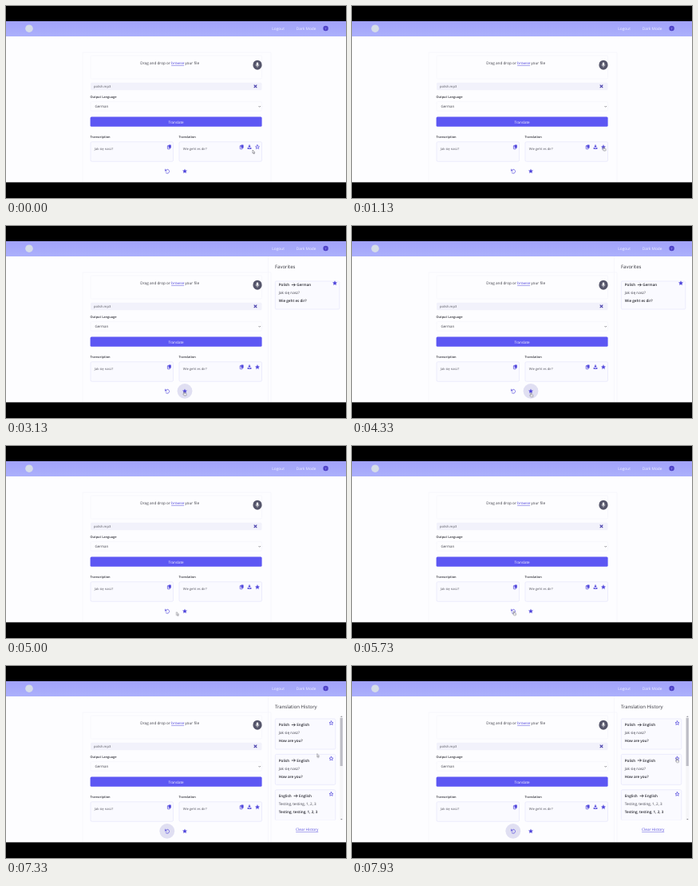
Write an HTML page that moves like this. It is 426 px wide and 240 px high and loops after 8000 ms.

```html
<!DOCTYPE html>
<html lang="en">
<head>
<meta charset="utf-8">
<title>Audio translator</title>
<style>
  html, body { margin: 0; width: 100%; height: 100%; overflow: hidden; background: #000; }
  svg { display: block; width: 100%; height: 100%; }
  text { font: 4.6px "Open Sans", "Noto Sans", sans-serif; fill: #3d3d46; text-rendering: geometricPrecision; }
  .head text { font-size: 4.8px; fill: #f0f0ff; }
  .label { font-size: 3.95px; font-weight: 600; fill: #33333a; }
  .small { font-size: 4.1px; fill: #55555e; }
  .title { font-size: 6px; font-weight: 500; fill: #33333a; }
  .bold { font-weight: 600; fill: #25252c; }
  .link { fill: #5147dc; text-decoration: underline; }
  .box { fill: #fafaff; stroke: #e6e6fb; stroke-width: .7; }
  .edge { fill: none; stroke: #f5f5fc; stroke-width: .8; }
  .solid { fill: #5147dc; }
  .line { fill: none; stroke: #5147dc; stroke-width: .7; stroke-linejoin: round; stroke-linecap: round; }
  .active { fill: #e0dff2; }
  .pointer { fill: #fff; stroke: #55555e; stroke-width: .5; stroke-linejoin: round; }

  .timed { animation: 8s step-end infinite; }
  .unsaved { animation-name: unsaved; }
  .saved { animation-name: saved; }
  .favorites { animation-name: favorites; }
  .history { animation-name: history; }
  .arrow { animation-name: arrow; }
  .hand { animation-name: hand; }
  .cursor { animation: travel 8s ease-in-out infinite; }

  @keyframes unsaved { 0% { opacity: 1 } 12%, 100% { opacity: 0 } }
  @keyframes saved { 0% { opacity: 0 } 12%, 100% { opacity: 1 } }
  @keyframes favorites { 0% { opacity: 0 } 32.5% { opacity: 1 } 60%, 100% { opacity: 0 } }
  @keyframes history { 0% { opacity: 0 } 77.5%, 100% { opacity: 1 } }
  @keyframes arrow {
    0% { opacity: 1 } 9% { opacity: 0 } 21% { opacity: 1 } 29% { opacity: 0 }
    62% { opacity: 1 } 65% { opacity: 0 } 82% { opacity: 1 } 97%, 100% { opacity: 0 }
  }
  @keyframes hand {
    0% { opacity: 0 } 9% { opacity: 1 } 21% { opacity: 0 } 29% { opacity: 1 }
    62% { opacity: 0 } 65% { opacity: 1 } 82% { opacity: 0 } 97%, 100% { opacity: 1 }
  }
  @keyframes travel {
    0%, 4% { transform: translate(309px, 180px) }
    11%, 20% { transform: translate(315.5px, 176px) }
    30%, 40% { transform: translate(223.5px, 207px) }
    54%, 59% { transform: translate(224.3px, 208.5px) }
    66%, 80% { transform: translate(203px, 206.5px) }
    91%, 93% { transform: translate(389.5px, 109.5px) }
    98%, 100% { transform: translate(407px, 115.5px) }
  }
</style>
</head>
<body>
<svg viewBox="0 0 426 240" preserveAspectRatio="none">
  <defs>
    <linearGradient id="bar" x2="0" y2="1">
      <stop stop-color="#a2a2fb"/><stop offset="1" stop-color="#abb0fb"/>
    </linearGradient>
    <path id="star" d="M0-3 .9-1 3-.8 1.4.6 1.9 2.7 0 1.6-1.9 2.7-1.4.6-3-.8-.9-1Z"/>
    <path id="outline" class="line" d="M0-2.5.8-.8 2.5-.6 1.2.5 1.6 2.2 0 1.3-1.6 2.2-1.2.5-2.5-.6-.8-.8Z"/>
    <g id="copy">
      <rect x="-2" y="-1.4" width="3" height="4" rx=".5" class="line"/>
      <rect x="-.7" y="-2.7" width="3.1" height="4" rx=".5" class="solid"/>
    </g>
    <path id="to" d="M0 0h4.6M2.8-1.7 4.6 0 2.8 1.7" fill="none" stroke="#25252c" stroke-width=".75"/>
    <clipPath id="list"><rect x="335" y="62" width="82" height="130.5"/></clipPath>
  </defs>

  <rect y="19" width="426" height="201.4" fill="#fdfdff"/>
  <g class="head">
    <rect y="19" width="426" height="19" fill="url(#bar)"/>
    <circle cx="29" cy="28.2" r="4.8" fill="#d5dce8"/>
    <text x="333.3" y="30">Logout</text>
    <text x="363.7" y="30">Dark Mode</text>
    <circle cx="400.6" cy="28" r="3.2" fill="#4d40c6"/>
    <text x="400.6" y="29.6" text-anchor="middle" style="font-size:4.3px;font-weight:600;fill:#a9a8fb">?</text>
  </g>

  <path class="edge" d="M96 220V58H332V220"/>
  <rect class="edge" x="106" y="62" width="214.5" height="29" rx="1.5"/>
  <text x="168.3" y="73.2" style="font-size:4.7px">Drag and drop or <tspan class="link">browse</tspan> your file</text>
  <rect x="309.5" y="67.7" width="11" height="12" rx="5.5" fill="#55556a"/>
  <rect x="313.8" y="70.6" width="2.4" height="4" rx="1.2" fill="#fff"/>
  <path d="M312.9 73.2a2.1 2.1 0 0 0 4.2 0M315 75.4v1.5" fill="none" stroke="#fff" stroke-width=".5"/>

  <rect x="106" y="95.8" width="214.5" height="9.4" rx="1.5" fill="#f2f2fb"/>
  <text class="small" x="110" y="102">polish.mp3</text>
  <path d="m310.7 98.6 3.6 3.6m0-3.6-3.6 3.6" fill="none" stroke="#4038a8" stroke-width="1.1"/>

  <text class="label" x="105.5" y="115.3">Output Language</text>
  <rect class="edge" x="106" y="119.7" width="214.5" height="11.5" rx="1.5"/>
  <text x="111.5" y="127.2" style="font-size:4.4px">German</text>
  <path d="m316.4 125 1.3 1.3 1.3-1.3" fill="none" stroke="#55555f" stroke-width=".6"/>

  <rect x="105.6" y="138.6" width="215" height="12.2" rx="1.5" fill="#5d57f3"/>
  <text x="213" y="146.6" text-anchor="middle" style="font-size:4.5px;fill:#fff">Translate</text>

  <text class="label" x="105.5" y="165.2">Transcription</text>
  <text class="label" x="216.5" y="165.2">Translation</text>
  <rect class="box" x="106" y="169.8" width="103.5" height="24.5" rx="1.5"/>
  <rect class="box" x="217" y="169.8" width="103.5" height="24.5" rx="1.5"/>
  <text class="small" x="110.8" y="179.5">Jak się nasz?</text>
  <text class="small" x="221.7" y="179.5">Wie geht es dir?</text>
  <use href="#copy" x="204.4" y="176.2"/>
  <use href="#copy" x="295.2" y="176.2"/>
  <path class="solid" d="M304.4 173.4h1.2v1.7h1.2L305 177l-1.8-1.9h1.2ZM302.6 177h1.2l1.2 1 1.2-1h1.2v1.8h-4.8Z"/>
  <use href="#outline" x="315" y="176.2" class="timed unsaved"/>
  <use href="#star" x="315" y="176.2" class="solid timed saved"/>

  <g class="timed favorites">
    <path class="edge" d="M328.5 38V220"/>
    <circle class="active" cx="224" cy="206.3" r="9.4"/>
    <text class="title" x="337" y="53">Favorites</text>
    <rect class="box" x="337.3" y="69" width="80.5" height="35" rx="1.5"/>
    <use href="#star" x="412" y="71.3" class="solid"/>
    <text class="bold" x="341.8" y="75.3">Polish</text>
    <use href="#to" x="357.8" y="73.6"/>
    <text class="bold" x="364.3" y="75.3">German</text>
    <text x="341.8" y="85.2">Jak się nasz?</text>
    <text class="bold" x="341.8" y="95.2">Wie geht es dir?</text>
  </g>

  <g class="timed history">
    <path class="edge" d="M328.5 38V220"/>
    <circle class="active" cx="201.8" cy="206.3" r="9.4"/>
    <text class="title" x="337" y="53">Translation History</text>
    <g id="entries" clip-path="url(#list)"></g>
    <rect x="418.3" y="62" width="4" height="131" fill="#f5f5f8"/>
    <rect x="418.6" y="65" width="3.2" height="60" fill="#bdbdc6"/>
    <path d="m419.1 63.8 1.2-1.2 1.2 1.2zm0 127.2 1.2 1.2 1.2-1.2z" fill="#77777f"/>
    <text class="link" x="377.2" y="206" text-anchor="middle" style="font-size:4.7px">Clear History</text>
  </g>

  <path class="line" d="M199.5 204.1v2h2m-1.8-.2a2.5 2.5 0 1 1 .4 2.4"/>
  <use href="#star" x="224" y="206.4" class="solid"/>

  <g class="cursor">
    <path class="pointer timed arrow" d="M0 0V4.2l1-.8.7 1.5.7-.3-.7-1.5h1.3Z"/>
    <path class="pointer timed hand" d="M-.5.4q.5-.8 1 0v1.7l1.8.5q.5.2.3.8L2.2 5H-.2L-1.6 3.1q.3-.7 1.1 0Z"/>
  </g>
</svg>
<script>
  const entries = [
    ["Polish", "Jak się nasz?", "How are you?"],
    ["Polish", "Jak się nasz?", "How are you?"],
    ["English", "Testing, testing, 1, 2, 3", "Testing, testing, 1, 2, 3"]
  ];
  document.getElementById("entries").innerHTML = entries.map(([from, spoken, translated], i) => {
    const arrowX = from === "Polish" ? 357.8 : 360.6;
    return `<g transform="translate(0 ${i * 44.4})">
      <rect class="box" x="337.3" y="66" width="75.5" height="38" rx="1.5"/>
      <use href="#outline" x="407.5" y="71.3"/>
      <text class="bold" x="341.8" y="75.3">${from}</text>
      <use href="#to" x="${arrowX}" y="73.6"/>
      <text class="bold" x="${arrowX + 6.5}" y="75.3">English</text>
      <text x="341.8" y="85.2">${spoken}</text>
      <text class="bold" x="341.8" y="95.2">${translated}</text>
    </g>`;
  }).join("");
</script>
</body>
</html>
```
